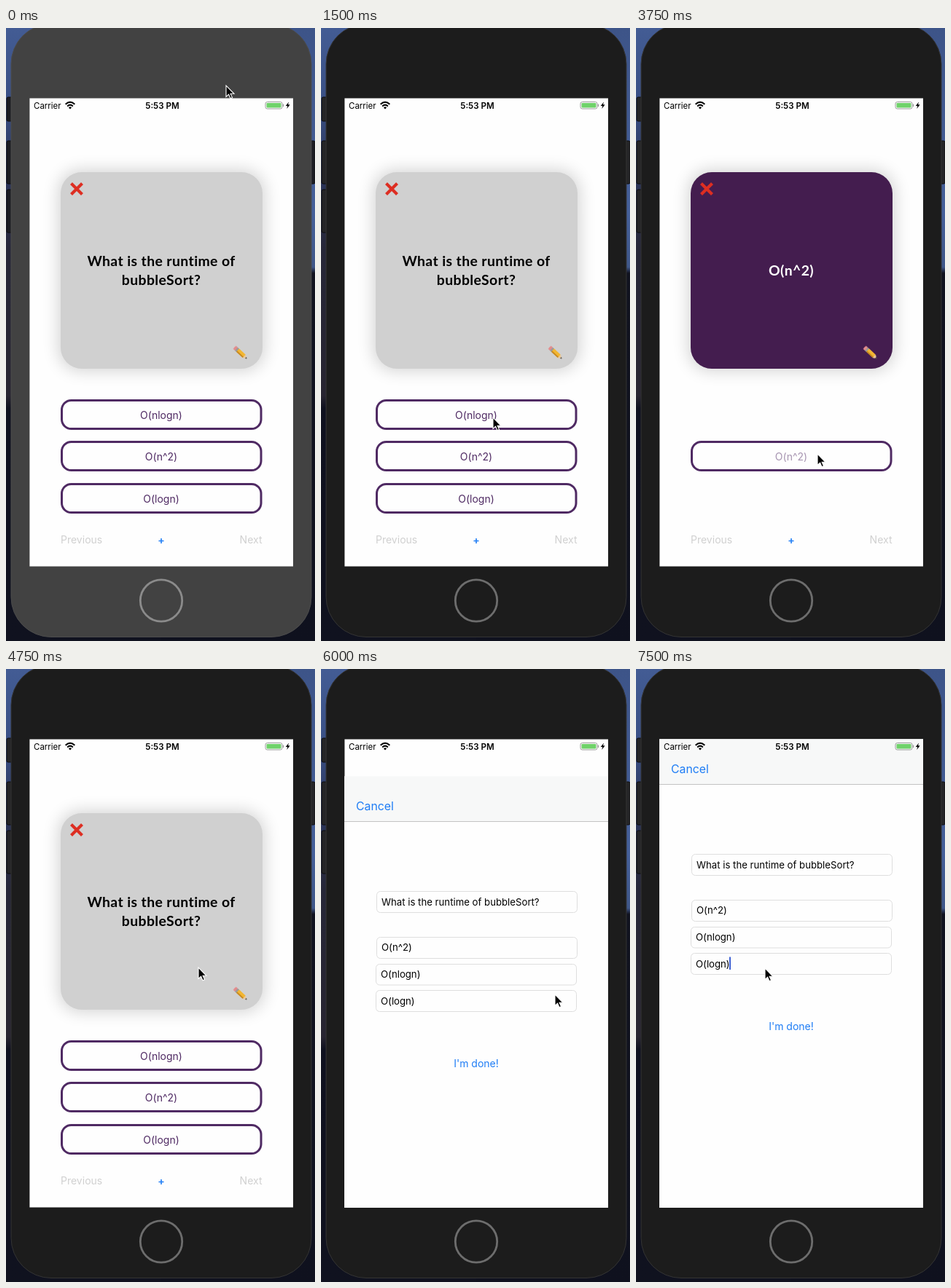
An HTML page that plays this animation: 424 px wide and 842 px high, repeating every 8000 ms.

```html
<!DOCTYPE html>
<html lang="en">
<head>
<meta charset="utf-8">
<title>Flashcards</title>
<style>
html, body { margin: 0; width: 100%; height: 100%; overflow: hidden; background: #10121f; }
svg { display: block; width: 424px; height: 842px; }
text { font: 14px Inter, sans-serif; }
.mid { text-anchor: middle; }
.status { font-size: 11.5px; }
.time { font-size: 11.6px; font-weight: 600; }
.question { font: bold 19.4px Lato, sans-serif; letter-spacing: .4px; font-variant-ligatures: none; }
.choice rect { fill: #fefefe; stroke: #4f2a63; stroke-width: 3; }
.choice text { fill: #4f2a63; }
.muted { fill: #d0d0d0; }
.blue { fill: #1f7df5; }
.cancel { font-size: 15.8px; }
.field rect { fill: #fefefe; stroke: #dedede; }
.field text { font-size: 13.2px; }

/* Every part shares one 8 s clock and changes on 250 ms ticks. */
.phone, .home, .side, .cursor, .answer, .first, .last, .first text, .second text, .last text,
.pencil, .modal, .caret { animation: 8s step-end infinite; }
.phone { animation-name: phone; }
.home { animation-name: home; }
.side { animation-name: side; }
.cursor { animation-name: cursor; }
.answer { animation-name: answer; }
.first { animation-name: first; }
.last { animation-name: last; }
.first text { animation-name: press-first; }
.second text { animation-name: press-second; }
.last text { animation-name: press-last; }
.pencil { animation-name: press-pencil; }
.modal { animation-name: modal; }
.caret { animation-name: caret; }

@keyframes phone { 0% { fill: #424242; stroke: #4c4c4c; } 3.125%, 100% { fill: #1c1c1c; stroke: #343434; } }
@keyframes home { 0% { stroke: #8b8b8b; } 3.125%, 100% { stroke: #6d6d6d; } }
@keyframes side { 0% { fill: #1c1d22; } 3.125%, 100% { fill: #252527; } }
@keyframes cursor {
  0% { transform: translate(302px, 79px); }
  9.375% { transform: translate(298px, 130px); }
  12.5% { transform: translate(270px, 310px); }
  15.625% { transform: translate(242px, 485px); }
  18.75% { transform: translate(236px, 535px); }
  31.25% { transform: translate(238px, 600px); }
  34.375% { transform: translate(240px, 641px); }
  40.625% { transform: translate(247px, 600px); }
  43.75% { transform: translate(249px, 585px); }
  53.125% { transform: translate(255px, 510px); }
  56.25% { transform: translate(264px, 410px); }
  65.625% { transform: translate(305px, 432px); }
  68.75% { transform: translate(321px, 447px); }
  78.125% { transform: translate(300px, 440px); }
  81.25% { transform: translate(240px, 424px); }
  84.375% { transform: translate(190px, 414px); }
  87.5%, 100% { transform: translate(177px, 411px); }
}
@keyframes answer { 0% { opacity: 0; } 46.875% { opacity: 1; } 59.375%, 100% { opacity: 0; } }
@keyframes first { 0% { opacity: 1; } 31.25% { opacity: 0; } 59.375%, 100% { opacity: 1; } }
@keyframes last { 0% { opacity: 1; } 37.5% { opacity: 0; } 59.375%, 100% { opacity: 1; } }
@keyframes press-first { 0% { opacity: 1; } 28.125% { opacity: .2; } 31.25%, 100% { opacity: 1; } }
@keyframes press-second { 0% { opacity: 1; } 43.75% { opacity: .2; } 46.875% { opacity: .5; } 50%, 100% { opacity: 1; } }
@keyframes press-last { 0% { opacity: 1; } 34.375% { opacity: .2; } 37.5%, 100% { opacity: 1; } }
@keyframes press-pencil { 0% { opacity: 1; } 71.875%, 100% { opacity: .2; } }
@keyframes modal {
  0% { transform: translateY(644px); }
  71.875% { transform: translateY(626px); }
  75% { transform: translateY(51px); }
  78.125%, 100% { transform: translateY(0); }
}
@keyframes caret { 0% { opacity: 0; } 90.625%, 100% { opacity: 1; } }
</style>
</head>
<body>
<svg viewBox="0 0 424 842">
  <defs>
    <linearGradient id="leftSky" x1="0" y1="0" x2="0" y2="1">
      <stop offset="0" stop-color="#435c94"/>
      <stop offset=".12" stop-color="#3a5085"/>
      <stop offset=".25" stop-color="#2a3459"/>
      <stop offset=".36" stop-color="#272738"/>
      <stop offset=".6" stop-color="#282531"/>
      <stop offset=".62" stop-color="#0f111f"/>
      <stop offset="1" stop-color="#10121f"/>
    </linearGradient>
    <linearGradient id="rightSky" x1="0" y1="0" x2="0" y2="1">
      <stop offset="0" stop-color="#3d5488"/>
      <stop offset=".3" stop-color="#45609a"/>
      <stop offset=".39" stop-color="#3f5789"/>
      <stop offset=".4" stop-color="#11131f"/>
      <stop offset="1" stop-color="#0f111e"/>
    </linearGradient>
    <filter id="glow" x="-20%" y="-20%" width="140%" height="140%">
      <feGaussianBlur stdDeviation="11"/>
    </filter>
    <clipPath id="screen"><rect x="32.4" y="96.4" width="361.6" height="643"/></clipPath>
  </defs>

  <rect width="212" height="842" fill="url(#leftSky)"/>
  <rect x="212" width="212" height="842" fill="url(#rightSky)"/>

  <g class="side" stroke="#0c0c0e">
    <rect x="1" y="95" width="10" height="33" rx="2"/>
    <rect x="1" y="155" width="10" height="59" rx="2"/>
    <rect x="1" y="222" width="10" height="59" rx="2"/>
    <rect x="414" y="155" width="10" height="59" rx="2"/>
  </g>
  <rect class="phone" x="7" y="-5.5" width="412" height="842" rx="55"/>
  <circle class="home" cx="213" cy="786.5" r="28.7" fill="none" stroke-width="2.8"/>

  <g clip-path="url(#screen)">
    <rect x="32" y="96" width="363" height="644" fill="#fefefe"/>

    <rect x="72" y="195" width="283" height="276" rx="30" opacity=".17" filter="url(#glow)"/>
    <rect x="75" y="198" width="277" height="270" rx="29" fill="#d0d0d0"/>
    <text class="question mid" x="213" y="327">What is the runtime of</text>
    <text class="question mid" x="213" y="353">bubbleSort?</text>
    <g class="answer">
      <rect x="75" y="198" width="277" height="270" rx="29" fill="#441d4f"/>
      <text class="question mid" x="213" y="339.5" fill="#fff">O(n^2)</text>
    </g>
    <path d="M89.5 213.5L104.5 228.5M104.5 213.5L89.5 228.5" stroke="#dd2e22" stroke-width="4.2"/>
    <g class="pencil">
      <g transform="translate(313.5 438.5) rotate(43)">
        <rect y="-3" width="4" height="6" rx="1.5" fill="#e58b8c"/>
        <rect x="3.5" y="-3" width="2.5" height="6" fill="#9a9a9a"/>
        <path d="M6-3H18V3H6z" fill="#f2b632"/>
        <path d="M6 1H18V3H6z" fill="#c98a20"/>
        <path d="M18-3L23 0L18 3z" fill="#e8c79a"/>
        <path d="M21-1.2L23.3 0L21 1.2z" fill="#333"/>
      </g>
    </g>

    <g class="choice first">
      <rect x="76.5" y="511.5" width="273.5" height="39" rx="13"/>
      <text class="mid" x="213" y="537">O(nlogn)</text>
    </g>
    <g class="choice second">
      <rect x="76.5" y="568.5" width="273.5" height="39" rx="13"/>
      <text class="mid" x="213" y="594">O(n^2)</text>
    </g>
    <g class="choice last">
      <rect x="76.5" y="626.5" width="273.5" height="39" rx="13"/>
      <text class="mid" x="213" y="651.5">O(logn)</text>
    </g>

    <text class="muted" x="75" y="708">Previous</text>
    <path d="M209.5 704.5H216.5M213 701V708" stroke="#1f7df5" stroke-width="1.6"/>
    <text class="muted" x="351.5" y="708" text-anchor="end">Next</text>

    <g class="modal">
      <rect x="32" y="96.4" width="363" height="644" fill="#fefefe"/>
      <rect x="32" y="96.4" width="363" height="62" fill="#f7f8f8"/>
      <path d="M32 158.5H395" stroke="#c3c3c3"/>
      <text class="blue cancel" x="48" y="143">Cancel</text>
      <g class="field">
        <rect x="76.5" y="254.5" width="275" height="29" rx="5"/>
        <text x="83" y="273.5">What is the runtime of bubbleSort?</text>
        <rect x="76.5" y="317.5" width="275" height="29" rx="5"/>
        <text x="83" y="336">O(n^2)</text>
        <rect x="75.5" y="354.5" width="275" height="28.5" rx="5"/>
        <text x="82" y="373">O(nlogn)</text>
        <rect x="75.5" y="390.5" width="275" height="29" rx="5"/>
        <text x="82" y="409.5">O(logn)</text>
      </g>
      <rect class="caret" x="128" y="395.5" width="2" height="17.5" fill="#3f62d6"/>
      <text class="blue mid" x="213" y="496">I'm done!</text>
    </g>

    <text class="status" x="38" y="110.5">Carrier</text>
    <g fill="none" stroke="#000" stroke-width="2.1">
      <path d="M81.7 104.8Q88 98.7 94.3 104.8"/>
      <path d="M84.2 107.4Q88 103.8 91.8 107.4"/>
    </g>
    <path d="M85.9 109.2Q88 107.4 90.1 109.2L88 111.4z"/>
    <text class="time mid" x="214.5" y="110.5">5:53 PM</text>
    <rect x="356" y="101.5" width="23" height="9.5" rx="2.5" fill="none" stroke="#9b9b9b"/>
    <rect x="357.5" y="103" width="20" height="6.5" rx="1" fill="#6fd26a"/>
    <path d="M380.5 104.5V108" stroke="#9b9b9b" stroke-width="1.3"/>
    <path d="M388 101.5L383.8 107H386.3L385.3 111L389.6 105.3H387z"/>
  </g>

  <g class="cursor">
    <path d="M0 0V15.5L3.6 12.2L6 17.7L8.5 16.6L6.1 11.3H11z" fill="#000" stroke="#fff" stroke-width="1.1"/>
  </g>
</svg>
</body>
</html>
```
